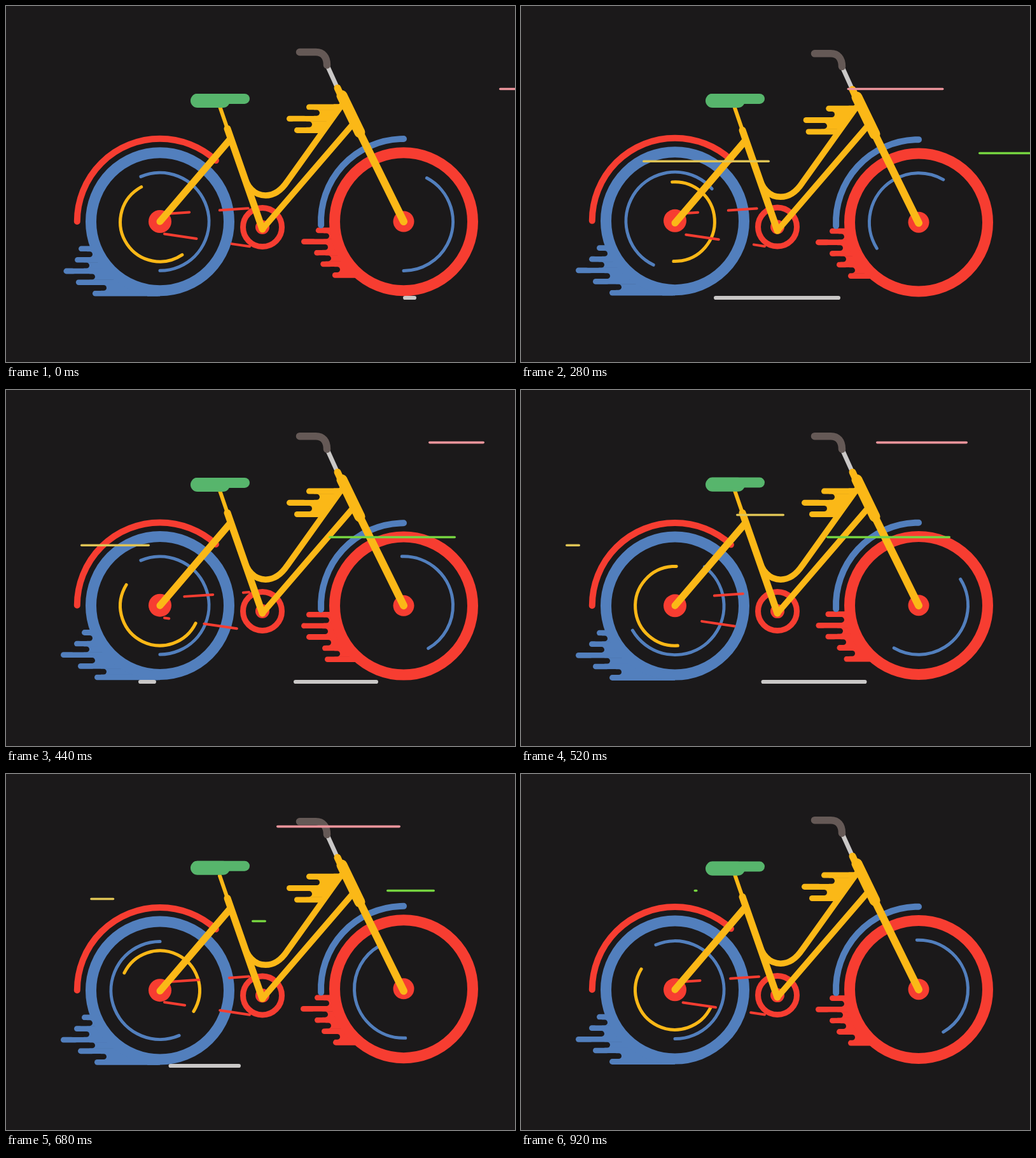
Recreate the animation shown at these times as an HTML page with a canvas. Size 800x560 px, loop 0.96 s.

```html
<!DOCTYPE html>
<html lang="en">
<head>
<meta charset="utf-8">
<title>Speeding bicycle</title>
<style>
html, body { margin: 0; width: 100%; height: 100%; overflow: hidden; background: #1b191a; }
canvas { display: block; width: 800px; height: 560px; }
</style>
</head>
<body>
<canvas id="stage" width="800" height="560"></canvas>
<script>
const LOOP = 960, STEP = 40, SPIN = 720 / LOOP;
const BG = '#1b191a', BLUE = '#527fbd', RED = '#f73d31', YELLOW = '#fbb817',
      GREEN = '#57b56c', GREY = '#cac8c7', GRIP = '#655956',
      PINK = '#ec949b', SAND = '#dfc455', LIME = '#76d440';
const c = document.getElementById('stage').getContext('2d');
const rad = deg => deg * Math.PI / 180;

function stroke(color, width, d) {
  c.strokeStyle = color;
  c.lineWidth = width;
  c.stroke(new Path2D(d));
}

function arc(color, width, x, y, r, from, to) {
  c.strokeStyle = color;
  c.lineWidth = width;
  c.beginPath();
  c.arc(x, y, r, rad(from), rad(to));
  c.stroke();
}

function disc(color, x, y, r) {
  c.fillStyle = color;
  c.beginPath();
  c.arc(x, y, r, 0, 7);
  c.fill();
}

// Horizontal pill whose outer ends are l and r
function pill(color, l, r, y, h) {
  c.fillStyle = color;
  c.beginPath();
  c.roundRect(l, y - h / 2, r - l, h, Math.min(h, r - l) / 2);
  c.fill();
}

function moved(dy, draw) {
  c.save();
  c.translate(0, dy);
  draw();
  c.restore();
}

// A passing gust: pushes each tongue by its own share of a wave
function gust(t, peak, span, size, wave, drift = 0) {
  const u = Math.max(0, Math.cos(Math.min(1, Math.abs(t - peak) / span) * Math.PI / 2));
  return i => u * (drift + size * Math.cos(wave * i));
}

// Wind tongues at rows of equal pitch, with rounded notches between them
function tongues(color, tips, gusts, notches, y, pitch, right) {
  const h = pitch / 2;
  const lefts = tips.map((x, i) => gusts.reduce((sum, g) => sum + g(i), x));
  c.fillStyle = color;
  notches.forEach((n, i) => c.fillRect(n - h, y + i * pitch + h / 2 - .5, right - n + h, h + 1));
  lefts.forEach((l, i) => {
    pill(color, l, right, y + i * pitch, h);
    c.fillRect(right - 20, y + i * pitch - h / 2, 20, h);
  });
  notches.forEach((n, i) => pill(BG, Math.max(lefts[i], lefts[i + 1]) - 6, n, y + (i + .5) * pitch, h));
}

// Key points of a passing line: time, left end, right end
const long = [[-250, 525, 528], [-160, 403, 491], [0, 191, 391], [80, 164, 359], [240, 70, 93], [258, 58, 60]];
const short = [[-300, 436, 440], [-240, 338, 414], [-160, 253, 323], [5, 4, 8]];
const road = [[-280, 624, 645], [-160, 452, 585], [0, 303, 502], [160, 208, 236], [180, 195, 198]];

function passing(keys, color, y, h, time, x, t) {
  for (const s of [t - time, t - time - LOOP]) {
    const i = keys.findIndex(k => s < k[0]);
    if (i < 1) continue;
    const a = keys[i - 1], b = keys[i], u = (s - a[0]) / (b[0] - a[0]);
    const end = k => x + a[k] + (b[k] - a[k]) * u;
    pill(color, end(1), end(2), y, h);
  }
}

function speedLines(t) {
  passing(long, PINK, 130.5, 3.6, 160, 372, t);
  passing(long, SAND, 244.2, 3.6, 280, 0, t);
  passing(long, LIME, 231.5, 3.4, 440, 316, t);
  passing(long, PINK, 82.6, 3.6, 600, 261, t);
  passing(short, SAND, 196.5, 3.4, 760, 0, t);
  passing(short, LIME, 183.5, 3.4, 920, 260, t);
  passing(road, GREY, 459, 6.2, 280, 0, t);
  passing(road, GREY, 459, 6.2, 600, 0, t);
}

function dashes(d, on, period, offset) {
  c.setLineDash([on, period - on]);
  c.lineDashOffset = offset;
  stroke(RED, 4, d);
  c.setLineDash([]);
}

function crank(t) {
  dashes('M250 327L382 318.2', 45, 92.7, -86 - t * .295);
  dashes('M249 358.6L383 378.3', 52, 107.7, 1 + t * .344);
  arc(RED, 9, 403, 348, 30.5, 0, 360);
  disc(RED, 403, 348, 11);
}

function rearWheel(t, sway) {
  tongues(BLUE, [119, 107, 86, 113, 139], [gust(t, 120, 150, -16, 1.8), gust(t, 600, 80, -7, .9)],
    [136, 131, 140, 158], 381.8, 17.6, 242);
  disc(BG, 242, 339.5, 101);
  arc(BLUE, 17, 242, 339.3, 108.5, 0, 360);
  arc(RED, 10, 242, 339, 130.2, 180, 312.5);
  const a = 247 + (t < 440 ? t * 360 / 440 : Math.min(720, t * SPIN + 30));
  arc(BLUE, 5, 242, 339.3, 77, a, a + 203);
  const b = 56 + t * SPIN;
  arc(YELLOW, 5, 242, 339.7 + .6 * sway, 62.4, b, b + 186);
  disc(RED, 242, 339, 18);
}

function frontWheel(t) {
  tongues(RED, [485, 463, 485, 496, 514], [gust(t, 120, 140, 8, 1), gust(t, 440, 120, -7, Math.PI, -6)],
    [508, 506, 511, 525], 353, 17.6, 575);
  disc(BG, 625, 339.5, 101);
  arc(RED, 17, 625, 339.3, 108.5, 0, 360);
  arc(BLUE, 10, 625, 339, 130, 177.5, 270);
  const a = 298 + t * SPIN;
  arc(BLUE, 5, 625, 339, 77.5, a, a + 152);
  disc(RED, 625, 339, 16.5);
}

function frame(t) {
  c.save();
  c.clip(new Path2D('M430 150H532L493 204H430Z'));
  tongues(YELLOW, [472, 441, 453], [gust(t, 200, 200, 9, 1.2)], [493, 481], 159, 18.2, 535);
  c.restore();
  stroke(GREY, 7, 'M506 96L520 127');
  stroke(GRIP, 11.5, 'M461.5 72.5H487C498 72.5 504.5 80 504.5 93');
  stroke(YELLOW, 6, 'M336 158L348 193');
  stroke(YELLOW, 11, 'M348 193L403 351');
  stroke(YELLOW, 9.5, 'M403 351L545 186');
  stroke(YELLOW, 11, 'M242 339L352 210');
  stroke(YELLOW, 9.5, 'M372 262C380 290 394 298 408 298C424 298 434 288 442 276L527 157');
  stroke(YELLOW, 11, 'M521 129L527 142');
  stroke(YELLOW, 17, 'M528 141L556 199');
  stroke(YELLOW, 12, 'M556 199L625 339');
}

function seat() {
  pill(GREEN, 290, 352, 149, 22);
  pill(GREEN, 292, 383, 145.9, 16);
}

function draw(t) {
  const turn = t / LOOP * 2 * Math.PI;
  const sway = Math.sin(turn), bob = 1.25 * (1 - Math.cos(2 * turn));
  c.fillStyle = BG;
  c.fillRect(0, 0, 800, 560);
  c.lineCap = c.lineJoin = 'round';
  moved(-1.2 * sway, () => rearWheel(t, sway));
  moved(1.2 * sway, () => frontWheel(t));
  moved(-.4 * sway, () => crank(t));
  moved(bob, () => frame(t));
  moved(1.3 * Math.min(0, sway), seat);
  speedLines(t);
}

const start = performance.now();
function tick() {
  const t = performance.now() - start + 1;
  draw(Math.floor(t / STEP) * STEP % LOOP);
  requestAnimationFrame(tick);
}
tick();
</script>
</body>
</html>
```
